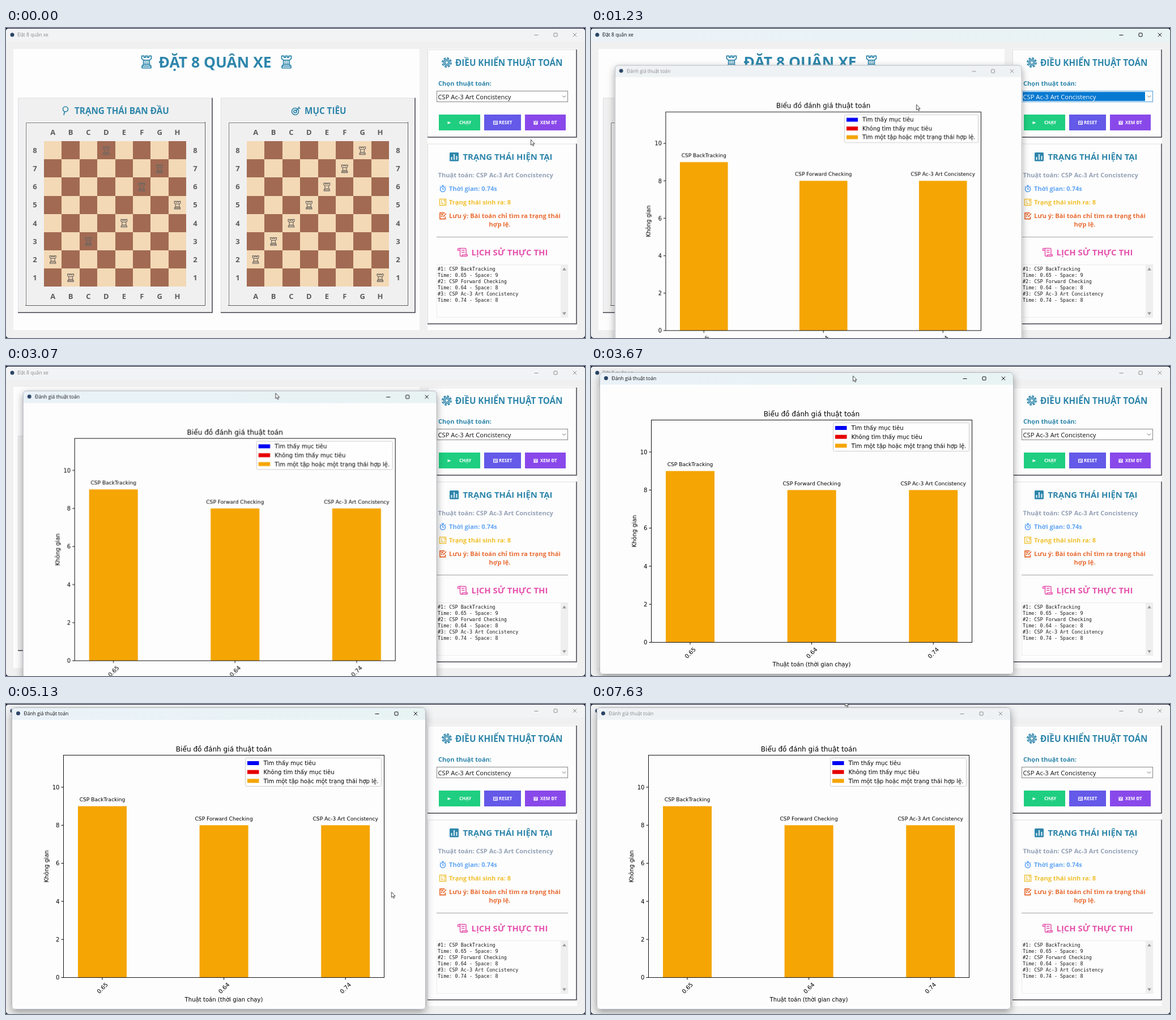
These frames come from a looping animation (1022x548 px, 7.66 s). An HTML page:

```html
<!DOCTYPE html>
<html lang="vi">
<head>
<meta charset="utf-8">
<title>Đặt 8 quân xe</title>
<style>
  html, body { margin: 0; width: 100%; height: 100%; overflow: hidden; background: #191a33; }
  svg { display: block; width: 1022px; height: 548px; }
  text { font-family: "Open Sans", "Noto Sans", sans-serif; white-space: pre; }
  .b { font-weight: 700; }
  .h { font-weight: 700; font-size: 15.25px; }
  .h2 { font-weight: 700; font-size: 14.9px; }
  .s { font-weight: 700; font-size: 11.1px; }
  .btn { font-weight: 700; font-size: 8px; fill: #fff; }
  .cap { font-size: 8.5px; fill: currentColor; }
  .log text { font: 8.45px "DejaVu Sans Mono", monospace; fill: #1c1c1c; }
  .chart text { font-family: "DejaVu Sans", sans-serif; font-size: 10.1px; fill: #000; }
  .chart .small { font-size: 9.12px; }
  .chart .big { font-size: 12.1px; }
  .mid { text-anchor: middle; }
  .end { text-anchor: end; }
  .line { fill: none; stroke: currentColor; }
  .teal { fill: #2e86ab; color: #2e86ab; }

  .mainbar, .mainon, .popup, .popbar, .popon, .cursor { animation: 7660ms infinite; }
  .mainbar { animation-name: mainbar; animation-timing-function: step-end; }
  .mainon { animation-name: mainon; animation-timing-function: step-end; }
  .popbar { animation-name: popbar; animation-timing-function: step-end; }
  .popon { animation-name: popon; animation-timing-function: step-end; }
  .popup { animation-name: popup; animation-timing-function: linear; }
  .cursor { animation-name: cursor; animation-timing-function: ease-in-out; }

  @keyframes mainbar { 0%, 16.5% { color: #8b8b8b; } 6.53% { color: #111; } }
  @keyframes mainon { 0%, 16.5% { opacity: 0; } 6.53% { opacity: 1; } }
  @keyframes popbar { 0%, 97.26% { color: #8b8b8b; } 16.5% { color: #111; } }
  @keyframes popon { 0%, 97.26% { opacity: 0; } 16.5% { opacity: 1; } }
  @keyframes popup {
    0%, 14.75% { opacity: 0; transform: translate(72px, 88px) scale(.9); }
    15.9% { opacity: 1; }
    16.06% { opacity: 1; transform: translate(42px, 65.4px) scale(.983); }
    16.97%, 33.94% { opacity: 1; transform: translate(36px, 61px); }
    35.64% { opacity: 1; transform: translate(38px, 62px); }
    47.91% { opacity: 1; transform: translate(15px, 11px); }
    50.91%, 100% { opacity: 1; transform: translate(10px, 6px); }
  }
  @keyframes cursor {
    0% { transform: translate(926px, 197px); }
    3.92%, 9.14% { transform: translate(948px, 170px); }
    16.06% { transform: translate(574px, 135px); }
    31.33%, 33.94% { transform: translate(481px, 68px); }
    35.64% { transform: translate(483px, 65px); animation-timing-function: linear; }
    47.91% { transform: translate(462px, 17px); }
    50.91%, 56.14% { transform: translate(457px, 12px); }
    65.27%, 74.41% { transform: translate(680px, 332px); }
    83.55%, 92.69% { transform: translate(450px, 17px); }
    96.61%, 100% { transform: translate(448px, -6px); }
  }
</style>
</head>
<body>
<svg viewBox="0 0 1022 548">
  <defs>
    <linearGradient id="glass">
      <stop offset="0" stop-color="#eaf2f8"/>
      <stop offset="1" stop-color="#e8f3f4"/>
    </linearGradient>
    <filter id="shade" x="-10%" y="-10%" width="120%" height="120%">
      <feDropShadow dx="0" dy="5" stdDeviation="7" flood-color="#000" flood-opacity=".36"/>
    </filter>
    <g id="rook" class="line" stroke-width="1.7" stroke-linejoin="round">
      <path d="M-8-10h4v2.500h2.500V-10h3v2.500H4V-10h4v4.500l-3 2.500v7l2.500 3v3h-15v-3l2.500-3v-7l-3-2.500zM-5-3H5M-5 4H5M-7.500 7h15"/>
    </g>
    <g id="controls" class="line">
      <path d="M-3.500.500h7M64.800-3.200l6.400 6.400M71.200-3.200l-6.400 6.400"/>
      <rect x="31" y="-3" width="6" height="6" rx="1"/>
    </g>
  </defs>

  <!-- main window -->
  <rect y="1" width="1022" height="547" rx="5" fill="#f0f0f0"/>
  <path d="M0 24V6q0-5 5-5h1012q5 0 5 5v18z" fill="#f2f3f5"/>
  <path class="mainon" d="M0 24V6q0-5 5-5h1012q5 0 5 5v18z" fill="url(#glass)"/>
  <g class="mainbar">
    <circle cx="11" cy="12" r="3.500" fill="#2b4566"/>
    <text class="cap" x="20" y="15.300">Đặt 8 quân xe</text>
    <use href="#controls" x="936" y="12"/>
  </g>
  <rect x="13" y="37" width="717" height="497" fill="#fdfdfd"/>
  <rect x="744" y="37" width="264" height="497" fill="#fdfdfd"/>
  <g class="teal">
    <use href="#rook" transform="translate(248 60) scale(1.06)"/>
    <use href="#rook" transform="translate(495 60) scale(1.06)"/>
    <path d="M245.500 58v5M248 58v5M250.500 58v5M492.500 58v5M495 58v5M497.500 58v5" class="line"/>
    <text class="b" x="269.500" y="69.500" font-size="26.400">ĐẶT 8 QUÂN XE</text>
  </g>
  <g id="boards"></g>

  <g class="teal">
    <g class="line" stroke-width="1.700">
      <circle cx="105" cy="143.500" r="4.500"/>
      <path d="M103.500 147.500l-1.500 6.500"/>
      <circle cx="510.500" cy="147.500" r="6"/><circle cx="510.500" cy="147.500" r="2.500"/>
      <path d="M511 147l6-6m0-2v3h3"/>
    </g>
    <text class="h" x="121" y="151.500">TRẠNG THÁI BAN ĐẦU</text>
    <text class="h" x="527" y="151.500">MỤC TIÊU</text>
  </g>

  <!-- side cards -->
  <g id="cards"></g>
  <g class="teal">
    <g class="line" stroke-width="1.600">
      <circle cx="778" cy="61" r="3"/>
      <circle cx="778" cy="61" r="5.400"/>
      <circle cx="778" cy="61" r="7.800" stroke-dasharray="4 2.130" stroke-width="2.200"/>
    </g>
    <text class="h" x="793" y="66.500">ĐIỀU KHIỂN THUẬT TOÁN</text>
    <text class="s" x="763" y="102">Chọn thuật toán:</text>
    <rect x="783" y="220" width="16" height="15.500" rx="1.500"/>
    <path d="M786.500 233v-5M791 233v-10M795.500 233v-7" stroke="#d7eaf2" stroke-width="2.200"/>
    <text class="h2" x="806.500" y="233.200">TRẠNG THÁI HIỆN TẠI</text>
  </g>

  <rect x="760.500" y="111.500" width="231" height="19" fill="#fff" stroke="#858585"/>
  <text x="762.500" y="125.500" font-size="11.200" fill="#111">CSP Ac-3 Art Concistency</text>
  <g class="mainon">
    <rect x="760.500" y="111.500" width="231" height="19" fill="#fff" stroke="#4a9bd8"/>
    <rect x="762" y="113" width="216" height="16" fill="#0879d1"/>
    <text x="762.500" y="125.500" font-size="11.200" fill="#fff">CSP Ac-3 Art Concistency</text>
  </g>
  <path d="M982 119.500l3 3 3-3" class="line" color="#666"/>

  <rect x="764" y="153" width="73" height="28" fill="#1fce80"/>
  <rect x="844" y="153" width="65" height="28" fill="#6459e8"/>
  <rect x="916" y="153" width="72" height="28" fill="#8949ea"/>
  <path d="M779.500 165l6 2.500-6 2.500z" fill="#fff"/>
  <g class="line" color="#fff">
    <rect x="860.500" y="164.500" width="7" height="6"/>
    <path d="M862 168.500v-2h4v2.500h-3"/>
  </g>
  <path d="M931.500 164h7v7h-7z" fill="#fff"/>
  <path d="M933.500 164v2.500h3V164M933 169h4" class="line" color="#8949ea"/>
  <text class="btn" x="800" y="170.300">CHẠY</text>
  <text class="btn" x="870" y="170.300">RESET</text>
  <text class="btn" x="943" y="170.300">XEM ĐT</text>

  <text class="s" x="762.500" y="263.500" fill="#95a2b7">Thuật toán: CSP Ac-3 Art Concistency</text>
  <g fill="#60a5f5" color="#60a5f5">
    <g class="line" stroke-width="1.700"><circle cx="771" cy="285" r="4.500"/><path d="M769 278.500h4M771 279v1.500M771 282.500v2.500h2M775 280l1 1M767 280l-1 1"/></g>
    <text class="s" x="782" y="287.700">Thời gian: 0.74s</text>
  </g>
  <g fill="#f0c02f" color="#f0c02f">
    <rect class="line" x="765.500" y="302.500" width="11" height="11" stroke-width="1.400"/>
    <path class="line" d="M769 304.500v3M772 304.800h2.500v2.700M767.800 309.300h2.400v2.700M773.500 309v3" stroke-width="1.300"/>
    <text class="s" x="782" y="311.800">Trạng thái sinh ra: 8</text>
  </g>
  <g fill="#e96d35" color="#e96d35">
    <path class="line" d="M774.500 327h-8.500v10.500h9.500v-4M768 330h4M768 333h2M771.500 334l5.500-6" stroke-width="1.800"/>
    <text class="s" x="782" y="335.800">Lưu ý: Bài toán chỉ tìm ra trạng thái</text>
    <text class="s mid" x="871.500" y="351.300">hợp lệ.</text>
  </g>
  <path d="M760 369.500h232" stroke="#a2a2a2"/>
  <g fill="#e653ad" color="#e653ad">
    <path class="line" d="M801.500 400v-8.500q0-2-2-2t-2 2v1.500h4M799.500 389.500h10.500q2 0 2 2v9M801.500 400v1q0 2.500 2 2.500h9q2 0 2-2.500h-9q0 2.500-2 2.500M804 393h5.500M804 396.500h5.500" stroke-width="1.500"/>
    <text class="h2" x="821.500" y="402">LỊCH SỬ THỰC THI</text>
  </g>
  <rect x="760.500" y="418.500" width="231" height="93" fill="#fdfdfd" stroke="#ececec"/>
  <rect x="979" y="419" width="12" height="92" fill="#efefef"/>
  <path d="M982 428.500l3.500-5 3.500 5zM982 502.500l3.500 5 3.500-5z" fill="#9a9a9a"/>
  <g id="log" class="log"></g>

  <!-- chart window -->
  <g class="popup">
    <rect width="731" height="534" rx="6" fill="#fdfdfd" filter="url(#shade)"/>
    <path d="M0 22V6q0-6 6-6h719q6 0 6 6v16z" fill="#eef2f4"/>
    <path class="popon" d="M0 22V6q0-6 6-6h719q6 0 6 6v16z" fill="url(#glass)"/>
    <rect x=".500" y=".500" width="730" height="533" rx="6" fill="none" stroke="#b3b6bc"/>
    <g class="popbar">
      <circle cx="11.500" cy="10.500" r="3.500" fill="#2b4566"/>
      <text class="cap" x="21.500" y="14.300">Đánh giá thuật toán</text>
      <use href="#controls" x="645" y="11"/>
    </g>
    <g id="chart" class="chart"></g>
  </g>

  <g class="cursor">
    <path transform="scale(.94)" d="M.500.500v10.200l2.300-2.100 1.600 3.600 1.700-.8-1.600-3.400h3.100z" fill="#fff" stroke="#222" stroke-width=".900"/>
  </g>
</svg>

<script>
  const fill = (id, parts) => { document.getElementById(id).innerHTML = parts.join(''); };
  const rect = (x, y, w, h, attrs) => `<rect x="${x}" y="${y}" width="${w}" height="${h}" ${attrs}/>`;
  const text = (x, y, cls, str, attrs = '') => `<text x="${x}" y="${y}" class="${cls}" ${attrs}>${str}</text>`;
  const path = (d, color, width = 1) => `<path d="${d}" fill="none" stroke="${color}" stroke-width="${width}"/>`;

  // Raised box: pale top and left edges, dark right and bottom edges
  const raised = (x, y, w, h, bg) =>
    rect(x, y, w, h, `fill="${bg}"`) +
    path(`M${x + .5} ${y + h}V${y + .5}H${x + w}`, '#dfdfe8') +
    path(`M${x + w - .5} ${y}V${y + h - .5}H${x}`, '#42424c', 1.5);

  const cellW = 31.4, cellH = 32.12;

  function board(left, rooks) {
    const x0 = left + 46, y0 = 200.2;
    const out = [
      raised(left, 123.5, 343.5, 380, '#f0f0f0'),
      rect(left + 13.5, 166.5, 316, 323, 'fill="none" stroke="#fff"'),
      path(`M${left + 14.5} 490V167.500H${left + 330}`, '#777'),
      path(`M${left + 13} 490.500H${left + 330.5}V166`, '#555')
    ];
    rooks.forEach((file, r) => {
      const mid = y0 + (r + .5) * cellH;
      const cx = x0 + (r + .5) * cellW;
      for (let c = 0; c < 8; c++) {
        out.push(rect(x0 + c * cellW, y0 + r * cellH, cellW, cellH,
          `fill="${(r + c) % 2 ? '#a26a53' : '#f3d9b6'}" shape-rendering="crispEdges"`));
      }
      out.push(`<use href="#rook" color="#6c6660" transform="translate(${x0 + (file + .5) * cellW} ${mid + .5}) scale(.68)"/>`);
      for (const x of [left + 30, left + 313]) out.push(text(x, mid + 4.8, 'b mid', 8 - r, 'font-size="13" fill="#5c5c5c"'));
      for (const y of [189, 478.5]) out.push(text(cx, y, 'b mid', 'ABCDEFGH'[r], 'font-size="13" fill="#5c5c5c"'));
    });
    return out.join('');
  }

  fill('boards', [board(21, [3, 6, 5, 7, 4, 2, 0, 1]), board(379, [6, 5, 4, 3, 2, 1, 0, 7])]);
  fill('cards', [raised(744, 38, 263.5, 155.5, '#fdfdfd'), raised(744, 204.5, 263.5, 319, '#fdfdfd')]);

  const runs = [
    ['CSP BackTracking', 0.65, 9],
    ['CSP Forward Checking', 0.64, 8],
    ['CSP Ac-3 Art Concistency', 0.74, 8]
  ];

  fill('log', runs.flatMap(([name, time, space], i) => [
    text(762, 428.7 + i * 22, '', `#${i + 1}: ${name}`),
    text(762, 439.7 + i * 22, '', `Time: ${time} - Space: ${space}`)
  ]));

  const base = 477.5, unit = 33.65;
  const chart = [
    text(374.5, 77.7, 'big mid', 'Biểu đồ đánh giá thuật toán'),
    text(374.5, 519.7, 'mid', 'Thuật toán (thời gian chạy)'),
    text(0, 0, 'mid', 'Không gian', 'transform="translate(64.500 281) rotate(-90)"')
  ];
  runs.forEach(([name, time, space], i) => {
    const x = 160 + i * 214.6, top = base - space * unit;
    chart.push(
      rect(x - 43, top, 86, base - top, 'fill="#f5a504"'),
      text(x, top - 8.8, 'small mid', name),
      path(`M${x} ${base}v4`, '#000'),
      text(0, 3.7, 'mid', time, `transform="translate(${x} 496) rotate(-45)"`)
    );
  });
  for (let v = 0; v <= 10; v += 2) {
    const y = base - v * unit;
    chart.push(path(`M91.500 ${y}h-4`, '#000'), text(84.5, y + 3.8, 'end', v));
  }
  chart.push(
    rect(91.5, 84.5, 566, 393, 'fill="none" stroke="#111"'),
    rect(412.5, 89.5, 240, 50, 'rx="2" fill="#fefefe" stroke="#ccc"')
  );
  [
    ['#0000f5', 'Tìm thấy mục tiêu'],
    ['#e60000', 'Không tìm thấy mục tiêu'],
    ['#f5a504', 'Tìm một tập hoặc một trạng thái hợp lệ.']
  ].forEach(([color, label], i) => {
    const y = 95 + i * 15.7;
    chart.push(rect(416, y, 20.5, 7, `fill="${color}"`), text(444.5, y + 7.2, '', label));
  });
  fill('chart', chart);
</script>
</body>
</html>
```
